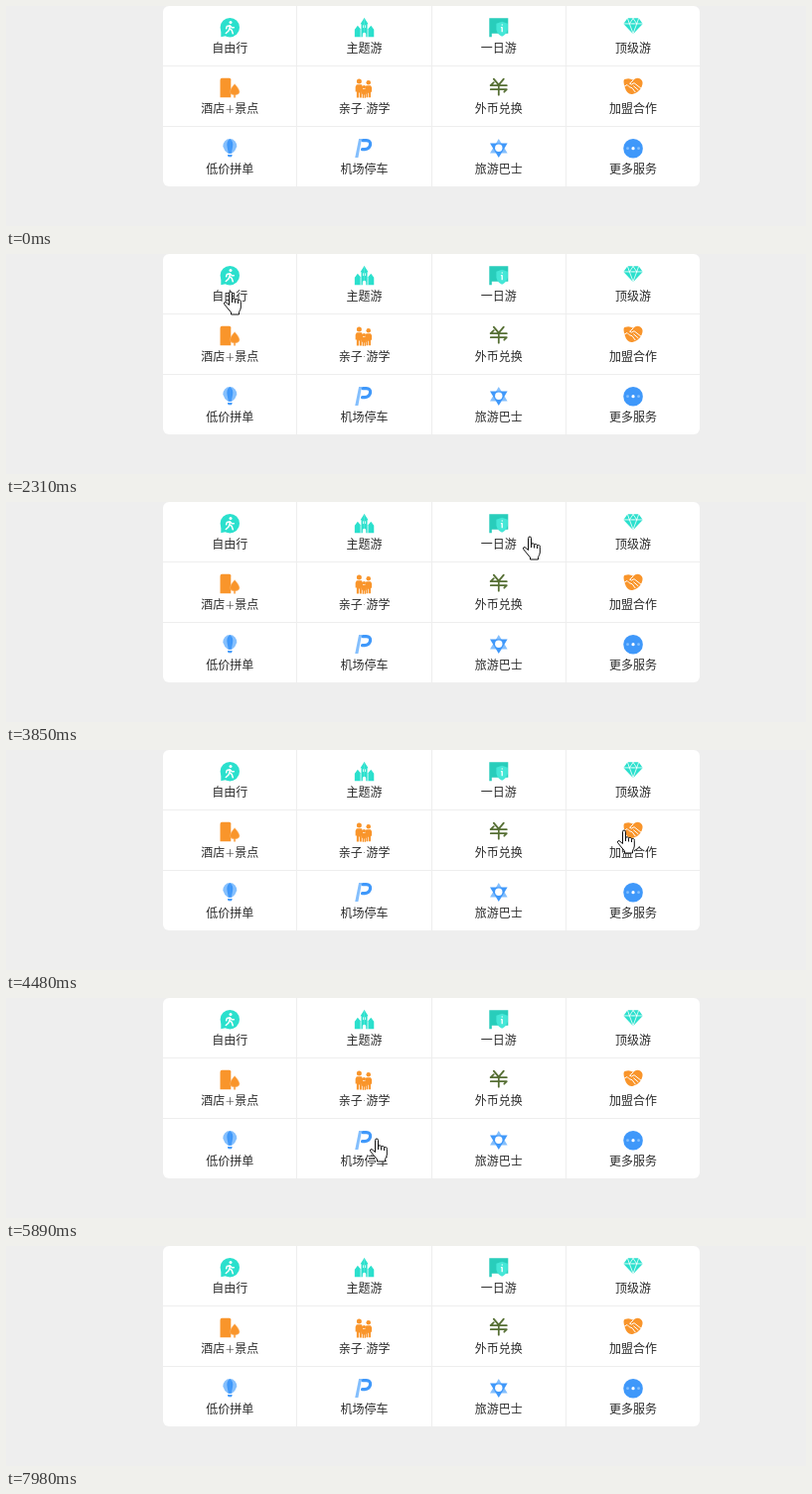
An HTML page that plays this animation: 805x222 px, repeating every 8 s.

```html
<!DOCTYPE html>
<html lang="zh-CN">
<head>
<meta charset="utf-8">
<style>
html, body { margin: 0; width: 100%; height: 100%; overflow: hidden; background: #eee; }
svg { display: block; }
text { font: 300 12px "DejaVu Sans", "Noto Sans CJK SC", "Noto Sans CJK", sans-serif; fill: #2b2b2b; text-anchor: middle; }
.line { fill: none; stroke-linecap: round; stroke-linejoin: round; }
</style>
</head>
<body>
<svg width="805" height="222" viewBox="0 0 805 222">
  <rect x="158" width="540" height="182" rx="6" fill="#fff"/>
  <path d="M158 60.5H698M158 121.5H698M292.5 0V182M428.5 0V182M563.5 0V182" stroke="#eee"/>
  <g id="cells"></g>
  <g id="cursor" fill="#fff" stroke="#111" stroke-linejoin="round">
    <path id="arrow" d="M.5 .7V16.5L4 13L6.5 18.5L9 17.4L6.6 12.2H11.5Z"/>
    <path id="hand" d="M6.5 14.5V2.5a1.5 1.5 0 0 1 3 0V9a1.5 1.5 0 0 1 3 .5a1.5 1.5 0 0 1 3 1a1.4 1.4 0 0 1 2.8 1V17Q18 19.5 16.5 21.5V24H8.5V22L1.5 13.5Q1 11.5 3 11.5ZM9.5 9V12M12.5 9.5V12.5M15.5 10.5V13"/>
  </g>
</svg>
<script>
const $ = id => document.getElementById(id);
const teal = '#2be0cd', orange = '#f9952b', olive = '#566f34', blue = '#3f98fa', sky = '#84bffd', white = '#fff';

// Icon parts, in a 20 by 20 box
const fill = (color, d) => `<path fill="${color}" d="${d}"/>`;
const line = (color, width, d) => `<path class="line" stroke="${color}" stroke-width="${width}" d="${d}"/>`;
const dot = (color, x, y, r) => `<circle fill="${color}" cx="${x}" cy="${y}" r="${r}"/>`;
const mirror = half => `${half}<g transform="translate(20) scale(-1 1)">${half}</g>`;
const person = (x, y, size) => `<g transform="translate(${x} ${y}) scale(${size})">` +
  dot(orange, 0, 2.5, 2.5) + fill(orange, 'M-2.5 5.8H2.5L3.7 8V13H2.5V19H.4V14H-.4V19H-2.5V13H-3.7V8Z') + '</g>';

const items = [
  ['自由行', dot(teal, 10, 10, 9.7) + fill(teal, 'M1 12V19.5L8 18Z') + dot(white, 10.7, 4.7, 1.5) +
    line(white, 1.5, 'M10 8L9.6 11L12 13L13 16M9.4 11.5L8.5 13.6L6 15.8M6.3 11L7 8.8L10 8L12 10H14')],
  ['主题游', mirror(fill(teal, 'M10.1 0L6 6.5H7V11.5H6.3L3.3 8L.3 12V19.5H8.3V17Q8.3 15 10.1 15Z')) +
    line(white, .8, 'M6.5 12V19.5M13.5 12V19.5M9 8V10M11 8V10')],
  ['一日游', fill('#28cdbb', 'M.5 .5H19.5V16H3V19.5H.5Z') +
    fill('#45e7d7', 'M13.3 4L19 6V12Q18 17 13.3 19Q8.5 17 7.6 12V6Z') + line(white, 1.3, 'M13.4 7.3V7.4M12.7 10H13.4V14')],
  ['顶级游', fill(teal, 'M4.4 .5H15.6L19.7 6.2L10 16.5L.3 6.2Z') + mirror(line(white, .8, 'M.3 6.2H10M4.4 .8L6.3 6.2L10 16M6.3 6.2L10 .8'))],
  ['酒店+景点', fill(orange, 'M2 0H9.5Q11 0 11 1.5V19.5H.2V2Q.2 0 2 0Z') +
    `<path fill="${orange}" stroke="#fbb468" stroke-width=".6" d="M14.8 6Q24 16 15.5 17V19.5H14V17Q5.8 16 14.8 6Z"/>`],
  ['亲子·游学', person(4.8, .8, 1) + person(14.2, 2.4, .9) + person(9.8, 7.2, .68)],
  ['外币兑换', line(olive, 1.8, 'M5 1L10 7L15 1M10 7V17M5 4.5L1.8 7.5H18M2 11.5H18L15.5 14')],
  ['加盟合作', fill(orange, 'M10 2Q14-1.5 17.5 1T18.5 9T10 16T1.5 9T2.5 1Q6-.5 10 2Z') +
    line(white, 1, 'M1 8.5L4 6.8L6.2 9L9 10L12 14M10 2.4L6.5 5.5Q8 7.6 11 5L18 10.5M10.6 8.2L15 12')],
  ['低价拼单', fill(sky, 'M10 .4A7.2 7.2 0 0 1 17 8Q16 12 12 15H8Q4 12 3 8A7.2 7.2 0 0 1 10 .4Z') +
    mirror(fill(blue, 'M10.1 .4Q6 3 7.4 9L8.6 15H10.1ZM7.6 16.2H10.1V18.5H8.3Z'))],
  ['机场停车', fill(sky, 'M4.5 .4H7.5L3.8 19.3H.7Z') + line(blue, 3.2, 'M8.5 2H12Q16.5 2 16 6.2T10.5 11H8')],
  ['旅游巴士', fill(sky, 'M10 .3L18.8 14.8H1.2Z') + fill(blue, 'M10 19.3L1.2 4.8H18.8Z') + dot(white, 10, 9.6, 3.7)],
  ['更多服务', dot(blue, 10, 10, 9.8) + mirror(dot(sky, 4.5, 10, 1.4)) + dot(white, 10, 10, 1.6)]
];
$('cells').innerHTML = items.map(([label, icon], i) => {
  const x = 225.3 + 135.25 * (i % 4), y = 61 * Math.floor(i / 4);
  return `<g transform="translate(${x - 10} ${y + 11.7})">${icon}</g><text x="${x}" y="${y + 47}">${label}</text>`;
}).join('');

// Pointer turns: step, left, top
const START = 530, END = 7980, STEP = 77.4;
const turns = [
  [0, 64, 205], [4, 76, 136], [5, 76, 136], [12, 213, 44], [22, 213, 44],
  [23, 218, 37], [28, 284, 24], [35, 380, 30], [44, 536, 35], [51, 614, 80],
  [55, 557, 105], [60, 280, 105], [63, 213, 136], [66, 255, 148], [77, 657, 123],
  [78, 660, 122], [81, 680, 165], [84, 671, 152], [91, 671, 152], [96, 805, 83]
];

function pointer(t) {
  const step = Math.max(0, Math.floor((t - START) / STEP + .15));
  const i = Math.max(1, turns.findIndex(turn => turn[0] >= step));
  const [s0, x0, y0] = turns[i - 1], [s1, x1, y1] = turns[i];
  const k = (step - s0) / (s1 - s0);
  return [Math.round(x0 + (x1 - x0) * k), Math.round(y0 + (y1 - y0) * k)];
}

const show = (id, on) => $(id).setAttribute('visibility', on ? 'visible' : 'hidden');

function draw(now) {
  const t = now % 8000, on = t >= START && t < END;
  const [x, y] = pointer(t);
  const over = x + 7 >= 158 && x + 7 < 698 && y < 182;
  $('cursor').setAttribute('transform', `translate(${x} ${y})`);
  show('arrow', on && !over);
  show('hand', on && over);
  requestAnimationFrame(draw);
}
draw(0);
</script>
</body>
</html>
```
